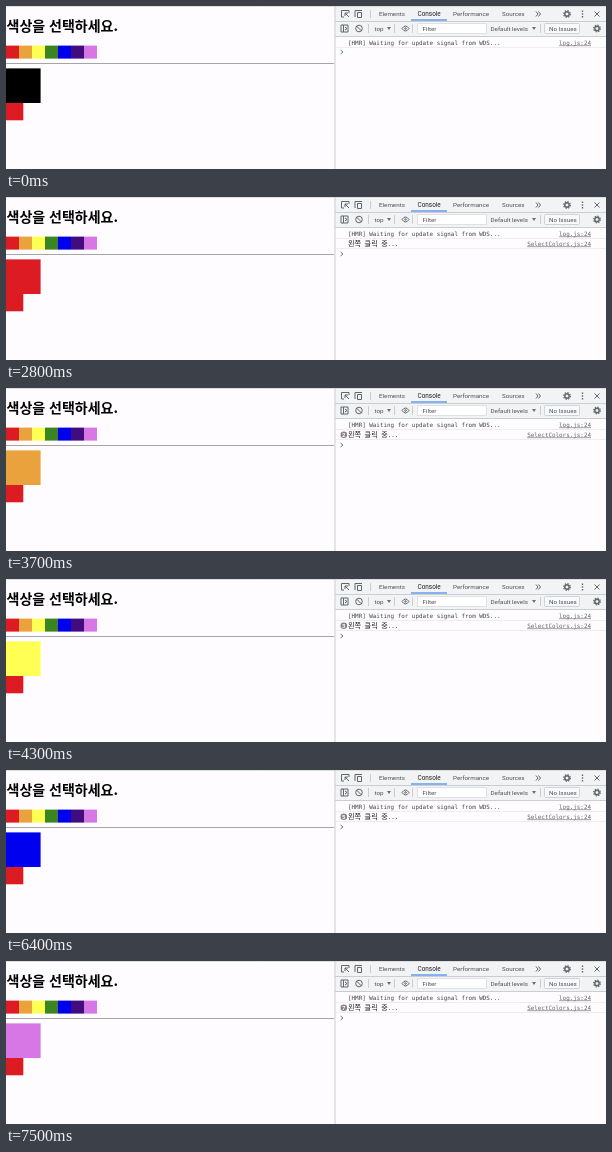
Write an HTML page that moves like this. It is 600 px wide and 163 px high and loops after 8000 ms.

```html
<!DOCTYPE html>
<html lang="ko">
<head>
<meta charset="utf-8">
<style>
html, body { margin: 0; width: 100%; height: 100%; overflow: hidden; background: #fefcfe; }
svg { display: block; width: 600px; height: 163px; }
text { white-space: pre; fill: #4d5054; font: 6.25px Roboto, sans-serif; }
.title { font: bold 14px "Noto Sans CJK KR", sans-serif; fill: #000; }
.log { font: 5.9px "DejaVu Sans Mono", monospace; fill: #444; }
.ko { font: 7.1px "Noto Sans Mono CJK KR", "Noto Sans CJK KR", monospace; fill: #222; }
.link { text-anchor: end; text-decoration: underline; fill: #666; }
.icon { fill: none; stroke: #62666b; stroke-width: 1; }
.rule { stroke: #cbcdd1; stroke-width: 1; }
</style>
</head>
<body>
<svg viewBox="0 0 600 163">
  <defs>
    <g id="gear" class="icon">
      <circle r="2.2" stroke-width="1.5"/>
      <circle r="3.4" stroke-width="1.1" stroke-dasharray="1.35 1.32"/>
    </g>
    <path id="arrow" d="M-2-1.4h4L0 1.6z" fill="#6e6e6e"/>
  </defs>
  <path d="M0 .5H600" stroke="#dedede"/>

  <text class="title" x="0.5" y="25.4">색상을 선택하세요.</text>
  <g id="swatches"></g>
  <path d="M0 57.5H328" stroke="#a5a5a5"/>
  <rect id="box" y="62.4" width="34.6" height="34.6"/>
  <rect y="97" width="17.3" height="17.3" fill="#dc1c22"/>

  <rect x="329" y="1" width="271" height="29" fill="#f1f3f4"/>
  <path class="rule" d="M329 0V163M329 15.5H600M329 30.5H600M364.5 4V12M362.5 18V27M388.5 18V27M406.5 18V27M534.5 18V27"/>
  <g class="icon">
    <path d="M338 11H335.5V4.5H343V7M339 7l4 4M339 10V7h3"/>
    <path d="M349 11V4.5H356M351.5 6.5h4v5h-4z"/>
    <path d="M335 19h7v7h-7zM337.5 19v7M339 21l2 1.5-2 1.5"/>
    <circle cx="353" cy="22.5" r="3.3"/><path d="M350.7 20.2l4.6 4.6"/>
    <path d="M396 22.500q3.500-5 7 0q-3.500 5-7 0z"/><circle cx="399.500" cy="22.500" r=".8"/>
    <path d="M530 5.500l2 2.500-2 2.500M532.500 5.500l2 2.500-2 2.500"/>
    <path d="M588.500 5.500l5 5M593.500 5.500l-5 5"/>
    <path d="M576.500 4.500v1.400M576.500 7.300v1.400M576.500 10.100v1.400" stroke-width="1.4"/>
  </g>
  <use href="#gear" x="561" y="8"/>
  <use href="#gear" x="591" y="22.5"/>
  <text x="373" y="10.3">Elements</text>
  <text x="411.5" y="10.3" style="fill:#222;font-size:6.4px">Console</text>
  <text x="447" y="10.3">Performance</text>
  <text x="496" y="10.3">Sources</text>
  <path d="M405 14H441" stroke="#1a73e8"/>

  <text x="368.5" y="24.8">top</text>
  <use href="#arrow" x="383" y="22.5"/>
  <rect x="411.5" y="17.5" width="69" height="10" fill="#fff" stroke="#dfe1e5"/>
  <text x="416.5" y="24.8">Filter</text>
  <text x="484.5" y="24.8">Default levels</text>
  <use href="#arrow" x="528" y="22.5"/>
  <rect x="538.5" y="17.5" width="35" height="10" rx="1" fill="#f8f9fa" stroke="#cfd2d6"/>
  <text x="543" y="24.8">No Issues</text>

  <text class="log" x="342" y="38.5">[HMR] Waiting for update signal from WDS...</text>
  <text class="log link" x="585" y="38.5">log.js:24</text>
  <path d="M330 41.5H600" stroke="#ededed"/>
  <g id="message">
    <text class="ko" x="342" y="49">왼쪽 클릭 중...</text>
    <text class="log link" x="585" y="48.5">SelectColors.js:24</text>
    <path d="M330 51.5H600" stroke="#ededed"/>
    <g id="badge">
      <circle cx="337.8" cy="46.8" r="3.3" fill="#8d7e8a"/>
      <text id="count" x="337.8" y="48.9" text-anchor="middle" style="fill:#fff;font-size:6px;font-weight:bold"></text>
    </g>
  </g>
  <path id="prompt" class="icon" d="M334.5 44l2.500 2-2.500 2"/>
</svg>
<script>
const LOOP = 8000;
const colors = ['#dc1c22', '#eaa23c', '#ffff54', '#3a8522', '#0000ee', '#430b80', '#d777e6'];
const clicks = [2500, 3400, 4200, 5700, 6300, 6900, 7400];
const $ = id => document.getElementById(id);

$('swatches').innerHTML = colors.map((color, i) =>
  `<rect x="${i * 13}" y="39.6" width="13" height="13" fill="${color}"/>`).join('');

function draw(now) {
  const time = now % LOOP;
  const count = clicks.filter(click => click <= time).length;
  $('box').setAttribute('fill', count ? colors[count - 1] : '#000');
  $('message').style.display = count ? '' : 'none';
  $('badge').style.display = count > 1 ? '' : 'none';
  $('count').textContent = count;
  $('prompt').setAttribute('transform', `translate(0 ${count ? 11 : 0})`);
  $('prompt').style.stroke = count ? '#777' : '#4a86e8';
  requestAnimationFrame(draw);
}
draw(performance.now());
</script>
</body>
</html>
```
